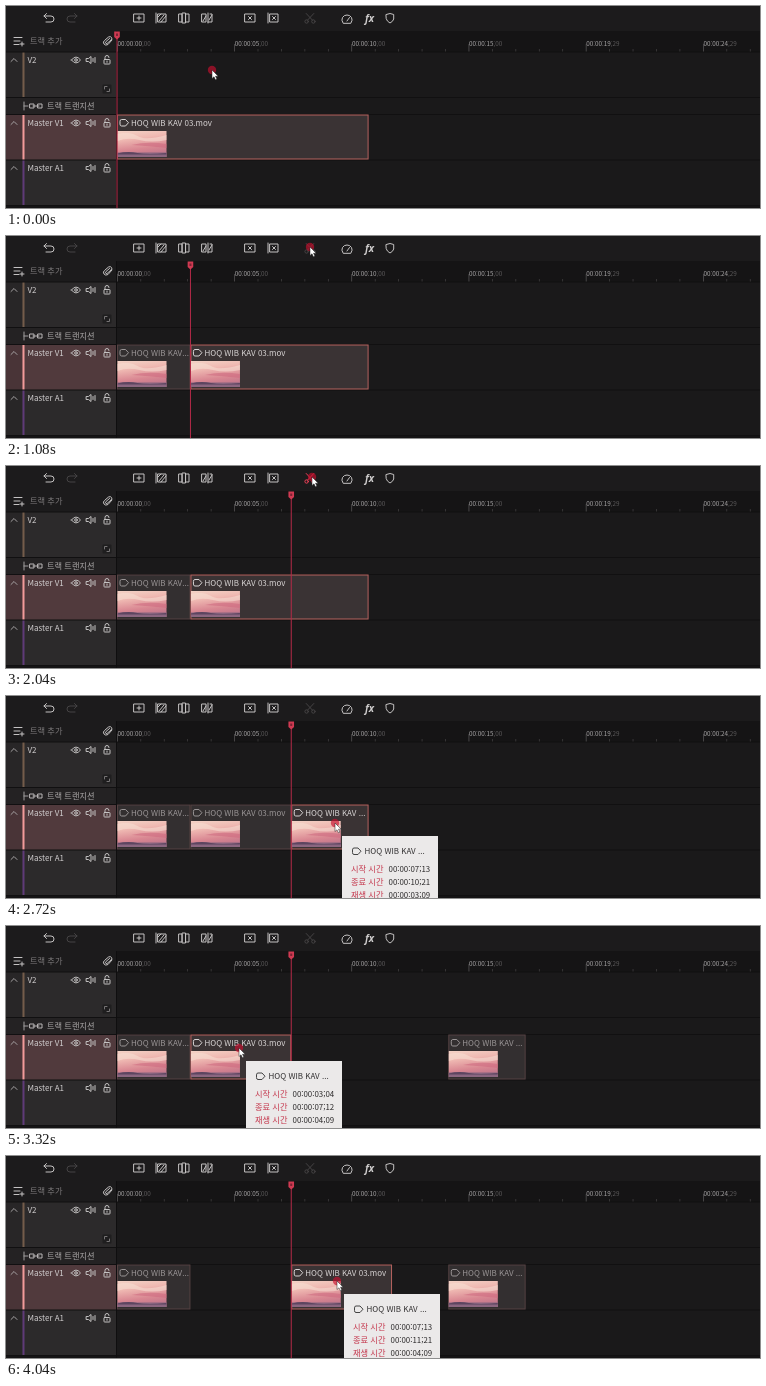
Animation, 754 px wide and 202 px high, one loop 4160 ms. Source, as an HTML page:

```html
<!DOCTYPE html>
<html lang="ko">
<head>
<meta charset="utf-8">
<title>Timeline cutting</title>
<style>
html, body { margin: 0; width: 100%; height: 100%; overflow: hidden; background: #1a1a1a; }
svg { display: block; width: 754px; height: 202px; }
text { font-family: "Noto Sans CJK KR", "Noto Sans CJK JP", "Noto Sans CJK SC", "Noto Sans", sans-serif; font-size: 8px; white-space: pre; }
.icon { fill: none; stroke: #c4c2c2; stroke-width: 1; stroke-linecap: round; stroke-linejoin: round; }
</style>
</head>
<body>
<svg viewBox="0 0 754 202">
  <defs>
    <linearGradient id="sky" x1="0" y1="0" x2=".25" y2="1">
      <stop offset="0" stop-color="#f3d3c6"/>
      <stop offset=".35" stop-color="#efb9b2"/>
      <stop offset=".75" stop-color="#d98792"/>
      <stop offset="1" stop-color="#c5788c"/>
    </linearGradient>
    <g id="thumb">
      <rect width="49" height="26" fill="url(#sky)"/>
      <path d="M0 3Q12 0 20 5T49 4V9Q34 12 22 9T0 10Z" fill="#f8e2d6" opacity=".55"/>
      <path d="M14 14Q30 10 49 13V17Q32 15 14 14Z" fill="#cf6b80" opacity=".6"/>
      <rect y="21.5" width="49" height="4.5" fill="#8b6680"/>
      <path d="M0 22.5Q10 20 20 22T49 22V23.5H0Z" fill="#5d4560"/>
    </g>
    <path id="film" d="M0 1.5Q0 0 1.5 0H5.5L8.5 3.2 5.5 6.5H1.5Q0 6.5 0 5Z"/>
    <g id="eye"><path d="M-4.5 0Q0-6 4.5 0Q0 6-4.5 0Z"/><circle r="1.3"/></g>
    <g id="speaker"><path d="M-4.5-1.5H-2.5L0-3.5V3.5L-2.5 1.5H-4.5ZM2-1.5V1.5M4-2.5V2.5"/></g>
    <g id="lock"><rect x="-3" y="-.5" width="6" height="4.5" rx=".6"/><path d="M-2-.5V-2.5Q-2-4.5 0-4.5T2-2.5M0 1V2.3"/></g>
    <path id="chevron" d="M-3 1.5L0-1.5 3 1.5"/>
    <g id="scissors">
      <path d="M-3.8-4.5L2.5 2.2M3.8-4.5L-2.5 2.2"/>
      <circle cx="-3.4" cy="3.5" r="1.7"/><circle cx="3.4" cy="3.5" r="1.7"/>
    </g>
  </defs>
  <g id="base"></g>
  <g id="live"></g>
</svg>
<script>
const LOOP = 4160, LEFT = 111, FRAME_W = 23.44 / 30;
const NAME = 'HOQ WIB KAV';

const frameX = f => LEFT + f * FRAME_W;
const rect = (x, y, w, h, fill, more = '') =>
  `<rect x="${x}" y="${y}" width="${w}" height="${h}" fill="${fill}" ${more}/>`;
const text = (x, y, s, fill, size = 8, weight = 400) =>
  `<text x="${x}" y="${y}" fill="${fill}" style="font-size:${size}px;font-weight:${weight}">${s}</text>`;
const use = (id, x, y, more = '') => `<use href="#${id}" x="${x}" y="${y}" ${more}/>`;
const icon = (x, y, d, more = '') => `<path class="icon" transform="translate(${x} ${y})" d="${d}" ${more}/>`;
const iconUse = (id, x, y, color = '#c4c2c2') => use(id, x, y, `class="icon" style="stroke:${color}"`);
const pad = n => String(n).padStart(2, '0');
const timecode = f => `00:00:${pad(Math.floor(f / 30))};${pad(f % 30)}`;

function toolbar() {
  const box = 'M-5-4H5V4H-5Z';
  return rect(0, 0, 754, 25, '#1c1b1c')
    + icon(43, 12, 'M-2.5-4.5L-5-2 -2.5.5M-5-2H2Q5-2 5 1T2 4H-3')
    + icon(66, 12, 'M2.5-4.5L5-2 2.5.5M5-2H-2Q-5-2-5 1T-2 4H3', 'style="stroke:#454344"')
    + icon(133, 12, box + 'M-2 0H2M0-2V2')
    + icon(155, 12, 'M-5-5V5M-3-4H5V4H-3ZM-2 3L3-3M0 4L5-2M-3-1L0-4')
    + icon(178, 12, 'M-5-4H-2V4H-5ZM2-4H5V4H2ZM-1.5-5H1.5V5H-1.5Z')
    + icon(201, 12, 'M-5-4H-1V4H-5ZM1-5V5M3-4H5V4H1M-4 3L-1-2M2 2L5-3')
    + icon(244, 12, box + 'M-1.5-1.5L1.5 1.5M1.5-1.5L-1.5 1.5')
    + icon(267, 12, 'M-5-5V5M-3-4H5V4H-3ZM-.5-1.5L2.5 1.5M2.5-1.5L-.5 1.5')
    + icon(341, 13, 'M-4 4Q-6 1-4.5-1.5Q-3-4 0-4T4.5-1.5Q6 1 4 4ZM0 2L2.5-1.5')
    + `<text x="359" y="16" fill="#d0cece" style="font-size:10px;font-style:italic;font-weight:700;font-family:'Noto Sans',sans-serif">fx</text>`
    + icon(384, 12, 'M-3.7-3.5L0-4.5 3.7-3.5V1Q3 3.5 0 5Q-3 3.5-3.7 1Z');
}

function ruler() {
  let out = rect(0, 25, 754, 21, '#151415');
  for (let s = 0; s < 28; s++) {
    const major = s % 5 === 0, x = frameX(s * 30);
    out += rect(x, major ? 38 : 43, .7, major ? 8 : 3, major ? '#5d5b5c' : '#454344');
    if (!major) continue;
    const code = timecode(s * 30 - (s > 15 ? 1 : 0));
    out += `<text x="${x + .5}" y="39.6" fill="#a9a7a8" style="font-size:6.3px">${code.slice(0, 8)}<tspan fill="#5c5a5b">${code.slice(8)}</tspan></text>`;
  }
  return out + rect(0, 25, 110, 21, '#1c1b1c')
    + icon(13, 35, 'M-5-3.5H3M-5 0H1M-5 3.5H0M3 1V5M1 3H5')
    + text(24, 38, '트랙 추가', '#7d7a7b', 8.2)
    + icon(102, 35, 'M4-1L0 3.5Q-2.5 5-4 3T-3.5-.5L.5-4Q2.5-5 3.5-3.5T3-1L-1 2.5Q-2 3-2.5 2T-2 .5L1.5-2.5');
}

function track(y, h, name, body, bar, video) {
  return rect(0, y, 110, h, body)
    + rect(0, y, 16, h, '#000', 'opacity=".1"')
    + rect(16.5, y, 2, h, bar)
    + iconUse('chevron', 8, y + 8, '#a5a2a3')
    + text(21.5, y + 11, name, '#d2cfd0')
    + (video ? iconUse('eye', 70, y + 8) : '')
    + iconUse('speaker', 85, y + 8)
    + iconUse('lock', 101, y + 8);
}

function base() {
  const line = y => rect(0, y, 754, 1, '#111011');
  return rect(0, 0, 754, 202, '#1a191a') + toolbar() + ruler()
    + track(46, 45, 'V2', '#2c2a2b', '#745c4b', true)
    + rect(96.5, 78.5, 9, 9, '#1f1e1f', 'rx="1"')
    + icon(101, 83, 'M-2.5 0V-2.5H0M2.5 0V2.5H0', 'style="stroke:#777475"')
    + rect(0, 91, 110, 18, '#242223')
    + icon(18, 100, 'M0-4V4M0 0H4', 'style="stroke:#a19e9f"')
    + icon(30, 100, 'M-6-2H-2V2H-6ZM2-2H6V2H2ZM-3 0H3', 'style="stroke:#b9b6b7"')
    + text(41, 103, '트랙 트랜지션', '#a9a6a7', 8.2)
    + track(109, 45, 'Master V1', '#513a3d', '#f29a9a', true)
    + track(154, 45, 'Master A1', '#2c2a2b', '#5f3a78', false)
    + rect(0, 199, 754, 3, '#151415')
    + [45.5, 91, 108, 153.5, 199].map(line).join('')
    + rect(110, 25, 1, 177, '#0f0e0f');
}

const path = [
  [80, 206, 64], [320, 186, 38], [440, 186, 38], [680, 267, 31], [900, 304, 11],
  [1260, 304, 11], [1480, 288, 32], [1580, 285, 38], [1720, 285, 38], [1960, 306, 11],
  [2140, 306, 11], [2520, 329, 127], [2740, 329, 127], [3040, 486, 127], [3100, 486, 127],
  [3290, 233, 122], [3360, 233, 122], [3880, 331, 125], [LOOP, 331, 125]
];

function cursorAt(t) {
  const i = path.findIndex(p => p[0] >= t);
  if (i < 1) return path[0].slice(1);
  const [t0, x0, y0] = path[i - 1], [t1, x1, y1] = path[i];
  const p = (t - t0) / (t1 - t0), e = p * p * (3 - 2 * p);
  return [x0 + (x1 - x0) * e, y0 + (y1 - y0) * e];
}

function clipsAt(t, cx) {
  const full = NAME + ' 03.mov', cut = NAME + '...', cutWide = NAME + ' ...';
  if (t < 1080) return [{ start: 0, length: 322, label: full, active: true }];
  const first = { start: 0, length: 94, label: cut };
  if (t < 2120) return [first, { start: 94, length: 228, label: full, active: true }];

  const second = { start: 94, length: 129, label: full };
  const third = { start: 223, length: 99, label: cutWide };
  const moved = origin => Math.round((cx - origin) / FRAME_W);
  third.start += t < 2740 ? 0 : t < 3100 ? moved(329) : 201;
  if (t >= 3360) {
    second.start += moved(233);
    if (Math.abs(second.start - 223) < 8) second.start = 223; // snaps to the playhead
  }
  const active = t < 3280 ? third : second;
  active.active = true;
  return active === third ? [first, second, third] : [first, third, second];
}

function drawClip({ start, length, label, active }) {
  const x = frameX(start), ink = active ? '#d8d4d4' : '#999495';
  return rect(x + .5, 109, length * FRAME_W - 1, 44, active ? '#3a3334' : '#332f30',
      `stroke="${active ? '#b5625f' : '#544142'}"`)
    + use('film', x + 3, 113.5, `class="icon" style="stroke:${ink}"`)
    + text(x + 14, 120, label, ink)
    + use('thumb', x + .5, 125);
}

function drawTooltip(x, y, { start, length }) {
  const row = (label, f, dy) =>
    text(x + 9, y + dy, label, '#c4364c', 8.2, 500) + text(x + 46.5, y + dy, timecode(f), '#2b292a', 7.9, 500);
  return rect(x, y, 96, 72, '#ebe9e9')
    + use('film', x + 10.5, y + 12, 'class="icon" style="stroke:#444"')
    + text(x + 22.5, y + 18, NAME + ' ...', '#333132', 8, 500)
    + row('시작 시간', start, 36)
    + row('종료 시간', start + length - 1, 49)
    + row('재생 시간', length, 62);
}

function drawPlayhead(x) {
  return rect(x - .5, 30, 1, 172, '#b52a48')
    + `<path d="M${x - 2.8} 25.5H${x + 2.8}V31L${x} 33.5L${x - 2.8} 31Z" fill="#d03a52"/>`
    + rect(x - 1, 27.5, 2, 2.5, '#7d2435');
}

function drawCursor(x, y, busy) {
  const halo = busy
    ? `<circle cx="${x}" cy="${y}" r="4.8" fill="#16343a" stroke="#a9e3e6" stroke-width="2" stroke-dasharray="2 1"/>`
    : `<circle cx="${x}" cy="${y}" r="4.2" fill="#c8102e" opacity=".65"/>`;
  return halo + `<path transform="translate(${x} ${y})" d="M0 0V8.5L2 6.8 3.4 9.8 4.9 9.1 3.5 6.2H6.2Z" fill="#fff" stroke="#222" stroke-width=".5"/>`;
}

const live = document.getElementById('live');
document.getElementById('base').innerHTML = base();

function render(t) {
  const [cx, cy] = cursorAt(t);
  const clips = clipsAt(t, cx);
  const head = t < 360 ? 0 : t < 1640 ? 94 : 223;
  const canCut = (t >= 360 && t < 1080) || (t >= 1640 && t < 2120);
  const hover = Math.hypot(cx - 304, cy - 12) < 8;
  const dragging = (t >= 2640 && t < 3100) || t >= 3300;
  live.innerHTML = iconUse('scissors', 304, 12, !canCut ? '#454344' : hover ? '#ee4058' : '#c4c2c2')
    + clips.map(drawClip).join('')
    + drawPlayhead(frameX(head))
    + (dragging ? drawTooltip(cx + 7, cy + 13, clips.find(c => c.active)) : '')
    + drawCursor(cx, cy, t >= 560 && t < 760);
}

function tick() {
  render(performance.now() % LOOP);
  requestAnimationFrame(tick);
}
tick();
</script>
</body>
</html>
```
